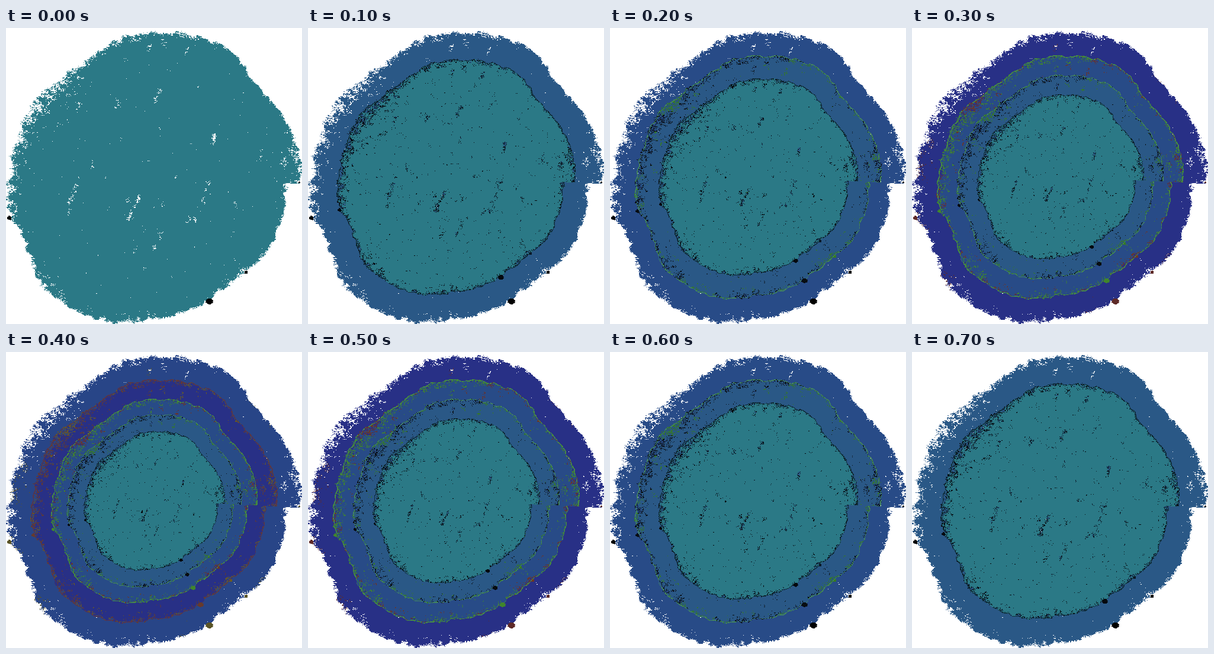
Animation of 500x500 px, one loop 800 ms. Source, as an HTML page with a canvas:

```html
<!DOCTYPE html>
<html lang="en">
<head>
<meta charset="utf-8">
<title>Chalk rings</title>
<style>
html, body { margin: 0; width: 100%; height: 100%; overflow: hidden; background: #fff; }
canvas { display: block; width: 100vw; height: 100vh; image-rendering: pixelated; }
</style>
</head>
<body>
<canvas id="stage" width="500" height="500"></canvas>
<script>
const N = 500, CX = 251, CY = 250;
// THIN chalk hides white paper but looks dark on other chalk; FAINT chalk does not cover at all
const EMPTY = 0, SOLID = 1, THIN = 2, FAINT = 3, RIM = 4, INK = 5;

// blob radius every 15 degrees, clockwise from the notch on the right
const NOTCH = 3, STEP = 15;
const radii = [223, 226, 227, 222, 225, 235, 242, 259, 264, 263, 246, 251, 245,
               239, 239, 226, 229, 241, 242, 247, 246, 232, 238, 245, 247];
// rough edge zones: angle, spread, depth
const zones = [[215, 24, 27], [175, 18, 13], [355, 8, 24], [99, 10, 9], [50, 13, 7], [133, 10, 9], [270, 20, 7]];
// slanted dry strokes: centre, length
const strokes = [[303, 43, 24], [114, 279, 52], [215, 303, 42], [332, 288, 72],
                 [254, 115, 24], [256, 360, 28], [122, 132, 12], [242, 32, 6]];
const SLANT = [-.37, .93];
// ink blots: centre, radius
const blots = [[343, 461, 6], [5, 320, 4], [405, 412, 3], [495, 260, 2]];

// colours by age of the layer
const fill = ['#2b7986', '#2a5886', '#284b87', '#283086', '#284587'].map(rgb);
const dark = [['#05090e', '#0a1826'], ['#080d12', '#357a22'], ['#40862c', '#6e3422'],
              ['#663a2c', '#6b5a20']].map(p => p.map(rgb));
const rim = ['#10303e', '#43855f', '#478a48', '#55364e'].map(rgb);
const ink = ['#000000', '#000000', '#000000', '#5e2a28', '#5a5426'].map(rgb);
const coreScale = [1, .808, .675, .565, .478];
const ringScale = [1, .835, .7, .593];

function rgb(hex) {
  const v = parseInt(hex.slice(1), 16);
  return [v >> 16, v >> 8 & 255, v & 255];
}

function hash(x, y) {
  let h = Math.imul(x, 374761393) + Math.imul(y, 668265263);
  h = Math.imul(h ^ h >>> 13, 1274126177);
  return ((h ^ h >>> 16) >>> 0) / 4294967296;
}

function noise(x, y) {
  const i = Math.floor(x), j = Math.floor(y);
  let u = x - i, v = y - j;
  u *= u * (3 - 2 * u);
  v *= v * (3 - 2 * v);
  const a = hash(i, j), b = hash(i + 1, j), c = hash(i, j + 1), d = hash(i + 1, j + 1);
  return (a + (b - a) * u) * (1 - v) + (c + (d - c) * u) * v;
}

// small stray strokes over the whole disc
for (let i = 0; i < 14; i++) {
  const a = i * 2.4, r = 50 * Math.sqrt(i + .5);
  strokes.push([CX + r * Math.cos(a), CY + r * Math.sin(a), 4 + 10 * hash(i, 5)]);
}

// Catmull-Rom through the radii, with a little wobble
function edgeRadius(deg) {
  const p = ((deg - NOTCH + 360) % 360) / STEP, i = Math.floor(p), t = p - i;
  const at = k => radii[Math.min(radii.length - 1, Math.max(0, k))];
  const a = at(i - 1), b = at(i), c = at(i + 1), d = at(i + 2);
  const curve = b + .5 * t * (c - a + t * (2 * a - 5 * b + 4 * c - d + t * (3 * (b - c) + d - a)));
  return curve + 5 * (noise(deg / 2.5, 3) - .5);
}

function roughness(deg) {
  return zones.reduce((w, [mid, spread, depth]) => {
    const off = Math.abs(deg - mid), d = Math.min(off, 360 - off) / spread;
    return w + depth * Math.exp(-d * d);
  }, 3.5);
}

function strokeDryness(x, y) {
  let near = Infinity;
  for (const [cx, cy, len] of strokes) {
    const dx = x - cx, dy = y - cy;
    const along = Math.abs(dx * SLANT[0] + dy * SLANT[1]);
    const across = dx * SLANT[1] - dy * SLANT[0];
    near = Math.min(near, Math.hypot(Math.max(0, along - len / 2), across));
  }
  return .27 * Math.exp(-near * near / 25);
}

function grain(x, y) {
  const deg = (Math.atan2(y - CY, x - CX) * 180 / Math.PI + 360) % 360;
  const depth = edgeRadius(deg) - Math.hypot(x - CX, y - CY);
  if (depth < -14) return EMPTY;
  const w = roughness(deg);
  const g = .4 * noise(x / 2.5, y / 1.6) + .35 * noise(x / 8 + 50, y / 7) + .25 * hash(x, y);
  const dry = depth > 0
    ? .12 + Math.max(.43 * Math.exp(-depth / w), strokeDryness(x, y))
    : .55 - depth * .3 / (1 + w * .2);
  if (g > dry + .06) return SOLID;
  if (depth < 8 && blots.some(([bx, by, r]) => Math.hypot(x - bx, y - by) < r * (.4 + g))) return INK;
  if (g >= dry) return THIN;
  if (Math.abs(depth) < 1) return RIM;
  return g > dry - .06 ? FAINT : EMPTY;
}

const mask = new Uint8Array(N * N);
for (let y = 0; y < N; y++)
  for (let x = 0; x < N; x++) mask[y * N + x] = grain(x, y);

function layerColor(kind, age, outer, x, y) {
  if (kind === SOLID || (outer && kind === THIN)) return fill[age];
  if (outer) {
    const stain = kind === FAINT && age > 2 && noise(x / 30, y / 30) > .7;
    return kind === INK || stain ? ink[age] : null;
  }
  if (kind === RIM) return rim[age];
  return dark[age][noise(x / 14 + 7, y / 14) > .57 ? 1 : 0];
}

function paint(count) {
  const img = new ImageData(N, N), px = img.data.fill(255);
  for (let age = count; age >= 0; age--) {
    const depth = count - age, s = (age ? ringScale : coreScale)[depth];
    for (let y = 0; y < N; y++) {
      const v = Math.round(CY + (y - CY) / s);
      if (v < 0 || v >= N) continue;
      for (let x = 0; x < N; x++) {
        const u = Math.round(CX + (x - CX) / s);
        if (u < 0 || u >= N) continue;
        const kind = mask[v * N + u];
        const c = kind && layerColor(kind, age, !depth, u, v);
        if (c) px.set(c, (y * N + x) * 4);
      }
    }
  }
  return img;
}

const poses = fill.map((_, count) => paint(count));
const ctx = document.getElementById('stage').getContext('2d');
let shown = -1;

// rings build up for four steps, then shrink back
function tick(now) {
  const pose = 4 - Math.abs(4 - Math.floor(now % 800 / 100));
  if (pose !== shown) ctx.putImageData(poses[shown = pose], 0, 0);
  requestAnimationFrame(tick);
}
tick(0);
</script>
</body>
</html>
```
